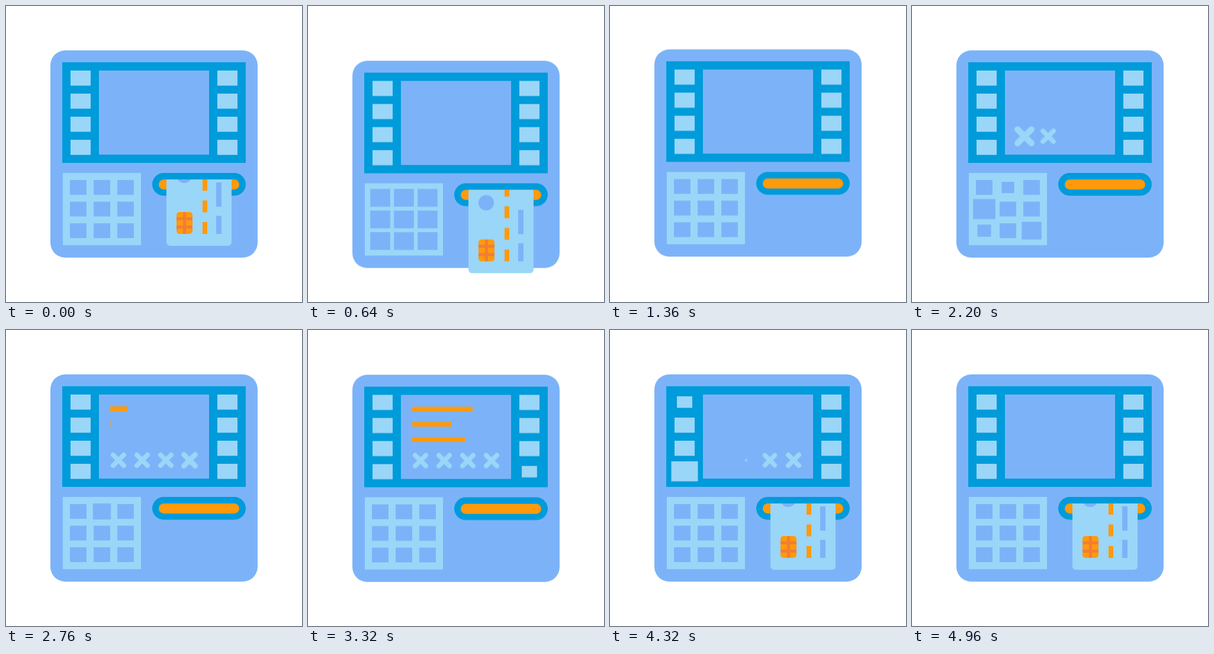
Recreate the animation shown at these times as an HTML page. Size 500 by 500 pixels, loop 5000 ms.

```html
<!DOCTYPE html>
<html lang="en">
<head>
<meta charset="utf-8">
<title>Cash machine</title>
<style>
  :root {
    --body: #7cb3f8;
    --dark: #009bda;
    --light: #9ad6f8;
    --orange: #ff9a0c;
    --rust: #f37c38;
    --sine: cubic-bezier(.37, 0, .63, 1);
  }
  html, body { margin: 0; width: 100%; height: 100%; overflow: hidden; background: #fff; }
  svg { display: block; width: 100%; height: 100%; }

  .body { fill: var(--body); }
  .dark { fill: var(--dark); }
  .light { fill: var(--light); }
  .orange { fill: var(--orange); }
  .rust { fill: var(--rust); }

  .machine, .card, .key, .button, .mark, .line {
    animation: 5s var(--sine) infinite both;
    animation-delay: var(--at, 0s);
  }
  .key, .button, .mark { transform-box: fill-box; transform-origin: center; }
  .line { transform-box: fill-box; transform-origin: left center; }

  .machine { animation-name: bounce; }
  .card { animation-name: slide; }
  .key { animation-name: swell; animation-delay: 0s; }
  .key.pressed { animation-name: swell, press; animation-delay: 0s, var(--at); }
  .button.pressed { animation-name: press; }
  .mark { animation-name: pop; stroke: var(--light); stroke-width: 8; stroke-linecap: round; fill: none; }
  .line { animation-name: draw, wipe; animation-delay: var(--at), var(--out); }

  @keyframes bounce {
    0%, 28.6%, 65.2%, 84%, 100% { transform: translateY(0); }
    11.2%, 76.4% { transform: translateY(20px); }
    21.2% { transform: translateY(-20px); }
  }
  @keyframes slide {
    0%, 86%, 100% { transform: translateY(0); }
    11.2%, 12.4%, 76.4%, 77.6% { transform: translateY(29.5px); }
    21.6%, 66% { transform: translateY(-116px); }
  }
  @keyframes swell {
    0%, 6.4%, 19.2%, 100% { scale: 1; }
    12.8% { scale: 1.2; }
  }
  @keyframes press {
    0%, 16%, 100% { transform: scale(1); }
    4% { transform: scale(.7); }
    10% { transform: scale(1.35); }
  }
  @keyframes pop {
    0%, 46.4%, 100% { transform: scale(0); }
    4% { transform: scale(1.35); }
    10%, 41.4% { transform: scale(1); }
  }
  @keyframes draw {
    0%, 46.01%, 100% { transform: scaleX(0); }
    9%, 46% { transform: scaleX(1); }
  }
  @keyframes wipe {
    0%, 60.01%, 100% { scale: 1 1; }
    8.8%, 60% { scale: 0 1; }
  }
</style>
</head>
<body>
<svg viewBox="0 0 500 500">
  <defs>
    <clipPath id="slot"><rect x="260" y="293" width="140" height="200"/></clipPath>
  </defs>
  <g class="machine">
    <rect class="body" x="75" y="75" width="350" height="350" rx="25"/>
    <rect class="dark" x="95" y="95" width="310" height="170"/>
    <rect class="body" x="157" y="109" width="186" height="142"/>
    <g id="buttons"></g>
    <g id="lines"></g>
    <g id="marks"></g>

    <rect class="light" x="96" y="282" width="132" height="122"/>
    <g id="keys"></g>

    <rect class="dark" x="247" y="282" width="158" height="38.5" rx="19.25"/>
    <rect class="orange" x="258" y="293" width="136" height="17" rx="8.5"/>
    <g clip-path="url(#slot)">
      <g class="card">
        <rect class="light" x="271" y="230" width="110" height="175" rx="6"/>
        <circle class="body" cx="301" cy="286" r="13"/>
        <g id="dashes"></g>
        <rect class="body" x="355" y="298" width="9" height="41"/>
        <rect class="body" x="355" y="354.5" width="9" height="30.5"/>
        <rect class="orange" x="288" y="348" width="27" height="37" rx="5"/>
        <path class="rust" d="M299 348h5v37h-5zM288 357h27v5h-27zM288 371h27v5h-27z"/>
      </g>
    </g>
  </g>
</svg>
<script>
  const NS = 'http://www.w3.org/2000/svg';

  function add(parent, tag, attrs, times = {}) {
    const el = document.createElementNS(NS, tag);
    for (const k in attrs) el.setAttribute(k, attrs[k]);
    for (const k in times) el.style.setProperty('--' + k, times[k] + 'ms');
    document.getElementById(parent).append(el);
  }

  // Cells are named column + row; presses maps a name to its start time.
  function grid(id, name, fill, xs, ys, width, height, presses) {
    xs.forEach((x, col) => ys.forEach((y, row) => {
      const at = presses['' + col + row];
      const cls = `${name} ${fill}` + (at ? ' pressed' : '');
      add(id, 'rect', { class: cls, x, y, width, height }, at ? { at } : {});
    }));
  }

  grid('buttons', 'button', 'light', [109, 357], [109, 148, 187, 226], 34, 25.5,
    { 13: 3180, '01': 3460, '03': 3765, '00': 4060 });
  grid('keys', 'key', 'body', [108, 148, 188], [294, 330.5, 367], 28, 25,
    { '01': 1700, 22: 1800, '02': 1915, 10: 2060 });

  [102, 66, 89].forEach((width, i) =>
    add('lines', 'rect', { class: 'line orange', x: 176, y: 129 + 25.7 * i, width, height: 8 },
      { at: 2600 + 120 * i, out: 3520 - 50 * i }));

  for (let i = 0; i < 4; i++) {
    const x = 181 + 40 * i;
    add('marks', 'path', { class: 'mark', d: `M${x} 211l18 18m0-18l-18 18` }, { at: 1930 + 140 * i });
    add('dashes', 'rect', { class: 'orange', x: 332, y: 255.5 + 36.5 * i, width: 8, height: 20 });
  }
</script>
</body>
</html>
```
